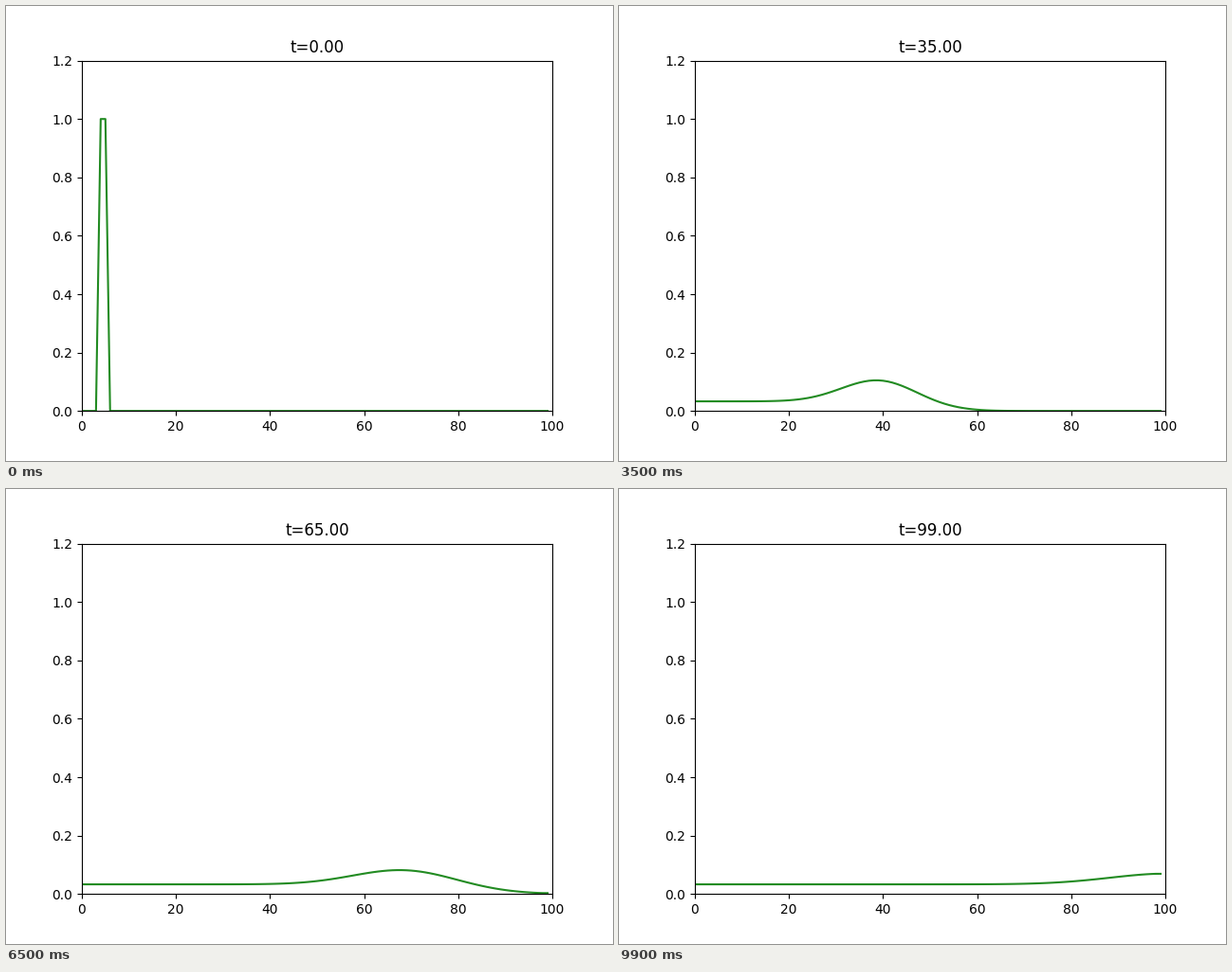
These frames come from a looping animation (640x480 px, 10 s). A matplotlib script:

```python
import numpy as np
import matplotlib.pyplot as plt
from matplotlib.animation import FuncAnimation

N = 100          # grid points, spacing 1
FRAMES = 100
DT = 0.1
STEPS = 10       # time steps per frame
SPEED = 1.0
DIFFUSION = 1.0


def step(u):
    """Explicit central step of advection-diffusion with zero-gradient ends."""
    left, mid, right = u[:-2], u[1:-1], u[2:]
    new = u.copy()
    new[1:-1] += DT * (DIFFUSION * (left - 2 * mid + right)
                       - SPEED * (right - left) / 2)
    new[0], new[-1] = new[1], new[-2]
    return new


def simulate():
    u = np.zeros(N)
    u[4:6] = 1.0
    states = [u]
    for _ in range(FRAMES - 1):
        for _ in range(STEPS):
            u = step(u)
        states.append(u)
    return states


states = simulate()

fig, ax = plt.subplots(figsize=(6.4, 4.8), dpi=100)
ax.set_xlim(0, 100)
ax.set_ylim(0, 1.2)
line, = ax.plot(np.arange(N), states[0], color="forestgreen")
title = ax.set_title("t=0.00")


def update(frame):
    line.set_ydata(states[frame])
    title.set_text(f"t={frame * STEPS * DT:.2f}")
    return line, title


anim = FuncAnimation(fig, update, frames=FRAMES, interval=100,
                     repeat=True, repeat_delay=0, blit=False)
plt.show()
```
